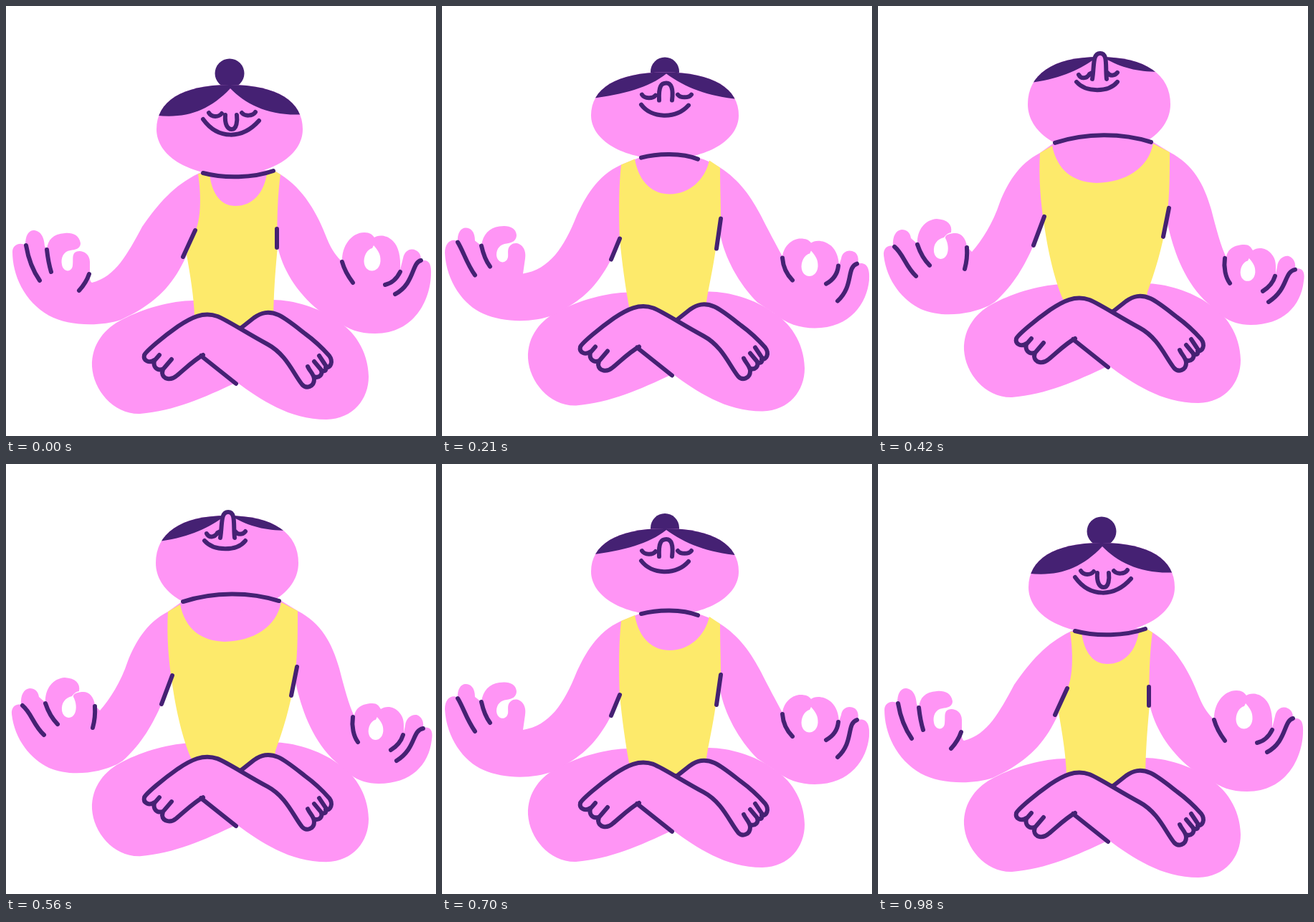
Write an HTML page with a canvas that moves like this. It is 600 px wide and 600 px high and loops after 1.05 s.

```html
<!DOCTYPE html>
<html lang="en">
<head>
<meta charset="utf-8">
<title>Meditation</title>
<style>
html, body { margin: 0; width: 100%; height: 100%; overflow: hidden; background: #fff; }
canvas { display: block; width: 100vw; height: 100vh; }
</style>
</head>
<body>
<canvas id="stage" width="600" height="600"></canvas>
<script>
const ctx = document.getElementById('stage').getContext('2d');
const SKIN = '#ff95f5', SUIT = '#fdea6b', INK = '#452173', PAPER = '#fff';
const STEP = 70, STEPS = 15, RISE = 23;

const thighs = new Path2D(`M262 411C230 411 190 423 163 437C138 449 119 472 120 503
  C122 536 150 570 187 569C235 565 275 547 322 525C355 549 395 577 447 577
  C485 576 506 548 506 517C505 480 485 453 462 439C438 421 400 410 373 410Z`);
const lap = new Path2D(`M256 438Q280 424 302 436L327 450L350 434Q366 423 384 433L384 475L256 475Z`);
const legLines = new Path2D(`M275 487C262 494 249 507 238 516C230 523 219 521 218 512L219 507L231 493
  M218 507C210 509 205 503 207 495L214 487M207 494C200 499 191 495 193 487
  C196 481 220 461 240 447C258 435 275 426 295 433C310 439 335 456 365 472
  C391 486 401 513 413 528C419 535 430 531 430 521C430 514 424 510 421 503
  M430 517C437 520 442 514 440 508L430 496M440 509C448 511 448 503 445 500L437 488
  M446 504C453 506 457 496 451 488C443 479 428 465 417 457C403 446 391 436 380 431
  C366 425 356 428 346 435L327 450M272 488L321 527`);

// x extent, top, bottom and widest height of a head outline
function headPath(l, t, r, b, mid) {
  const cx = (l + r) / 2, w = (r - l) / 2, up = (mid - t) * 0.62, dn = (b - mid) * 0.57;
  const p = new Path2D();
  p.moveTo(cx, t);
  p.bezierCurveTo(cx + w * 0.66, t, r, mid - up, r, mid);
  p.bezierCurveTo(r, mid + dn, cx + w * 0.57, b, cx, b);
  p.bezierCurveTo(cx - w * 0.57, b, l, mid + dn, l, mid);
  p.bezierCurveTo(l, mid - up, cx - w * 0.66, t, cx, t);
  return p;
}

function ringHole(x, y, s) {
  const p = new Path2D();
  p.moveTo(x + 2 * s, y - 20 * s);
  p.bezierCurveTo(x + 8 * s, y - 13 * s, x + 12 * s, y - 8 * s, x + 11.5 * s, y + 2 * s);
  p.bezierCurveTo(x + 10 * s, y + 20 * s, x - 11 * s, y + 20 * s, x - 11.5 * s, y + 2 * s);
  p.bezierCurveTo(x - 11 * s, y - 9 * s, x - 5 * s, y - 15 * s, x, y - 16 * s);
  p.closePath();
  return p;
}

function pose(o) {
  const p = { lift: o.lift, bun: o.bun, hole: ringHole(...o.hole), head: headPath(...o.head) };
  for (const k of ['skin', 'suit', 'hair', 'lines', 'face']) p[k] = new Path2D(o[k]);
  return p;
}

const restArms = `C235 250 213 275 190 308C170 345 153 378 120 386Q116 384 117 375L117 357
  C117 343 102 339 96 344C92 348 94 354 93 362C92 372 80 372 78 361C76 352 80 342 90 341
  C96 340 104 339 104 331C102 319 92 316 82 317C66 318 58 326 57 340L54 335
  C53 319 46 313 38 313C31 314 27 320 27 334C20 329 9 333 9 343C9 375 25 412 60 432
  C85 446 130 448 160 438L180 428C215 408 235 385 251 350L264 313L379 335
  C385 365 405 400 437 425L462 440C478 451 492 457 515 457C570 457 592 410 593 375
  C594 360 590 352 578 356C580 350 578 344 572 341C564 337 556 342 554 352L550 368
  C551 350 548 336 540 328C530 318 518 320 514 323C511 319 508 316 500 316
  C482 316 468 335 469 357C462 350 455 342 448 325C435 290 415 255 383 235`;
const restSuit = `C272 260 273 295 264 315L252 347C257 375 262 405 263 432L300 455L373 455
  C373 400 376 370 379 335C378 320 378 270 383 235`;
const restLines = `M28 334C31 352 38 370 47 383M57 340Q59 358 63 371M116 374Q112 386 102 397
  M264 313L247 350M469 357C472 368 478 378 484 386M550 371C545 381 538 387 529 389
  M579 355C566 358 570 388 543 402`;

const rest = pose({
  lift: 0, hole: [511, 354, 1], bun: [312, 94, 20.5],
  head: [210, 110, 414, 236, 172],
  skin: `M268 234${restArms}L373 229L276 230Z`,
  suit: `M268 234${restSuit}L373 229L364 234C360 260 345 279 320 279C300 279 287 262 284 234Z`,
  hair: `M200 100L313 100L313 115C282 148 248 158 205 152ZM313 100L425 100L418 151C370 155 335 138 313 115Z`,
  lines: `${restLines}M275 233C305 241 345 240 373 230M378 311L378 337`,
  face: `M275 158C296 187 330 186 353 160M283 149C287 156 297 155 301 150M329 149C333 154 344 154 348 148
    M306 152C305 165 309 172 315 172C322 172 323 160 322 152`
});

// shares the resting arms, so it is drawn at the resting height
const lookUp = pose({
  lift: 0, hole: [511, 354, 1], bun: [312, 99, 20.5],
  head: [210, 104, 410, 223, 160],
  skin: `M268 234${restArms}C370 225 355 221 345 221L300 221C285 223 276 229 268 234Z`,
  suit: `M268 234${restSuit}Q376 229 367 225C362 260 345 278 320 278C300 278 285 262 283 228Z`,
  hair: `M200 95L320 95L320 110C288 132 250 147 205 150ZM320 95L420 95L415 150C378 146 345 132 320 110Z`,
  lines: `${restLines}M291 223.5Q318 225 345 221M374 305L377 339`,
  face: `M276 152C294 176 332 176 354 155M283 140C287 148 297 148 301 140M333 140C337 147 347 147 351 140
    M308 151C306 136 310 134 316 134C324 134 326 141 325 150`
});

const mid = pose({
  lift: 14.1, hole: [513, 359, 1], bun: [311, 89, 20],
  head: [208, 90, 414, 211, 150],
  skin: `M250 219C215 235 200 265 188 290C170 335 150 365 113 371L116 350
    C119 332 104 324 96 331C90 336 93 343 92 348C90 358 77 357 76 345C76 335 82 330 90 329
    C98 328 104 325 104 317C103 306 92 303 80 305C66 307 57 316 55 332L46 325
    C46 312 40 307 33 307C26 307 21 315 22 326C14 321 4 327 4 342C6 382 30 415 58 427
    C85 439 125 440 155 429L178 416C205 400 222 378 236 351L248 322L388 315
    C394 348 414 385 440 411L463 426C480 441 500 447 520 447C570 447 593 412 596 380
    C597 365 594 354 580 357C582 350 580 344 576 341C568 336 558 340 557 350L554 359
    C553 348 551 340 543 332C532 323 520 324 515 328C512 324 508 322 500 322
    C490 322 477 331 475 347C466 330 455 310 445 290C432 265 415 240 388 223Q372 213 357 209L278 208Z`,
  suit: `M250 219C246 255 247 300 248 322C251 355 256 390 261 417L300 441L369 441L369 410
    C372 390 378 365 382 336L389 294C389 270 388 250 388 223L373 213C367 240 345 260 318 260
    C295 260 275 245 269 211Z`,
  hair: `M200 80L313 80L313 92C288 112 250 122 203 127ZM313 80L425 80L420 128C375 125 340 112 313 92Z`,
  lines: `M22 327C30 340 34 356 46 373M55 332Q59 350 67 361M248 322L236 351M389 294L383 336
    M475 349C476 362 480 371 489 380M553 360C552 370 547 379 536 385M579 357C564 362 575 388 552 409
    M278 209C300 203 335 202 357 211`,
  face: `M278 135C292 154 326 156 344 136M279 121C283 127 294 127 298 122M329 121C333 126 344 126 348 121
    M303 129C302 109 306 105 313 105C320 105 323 113 321 129`
});

const high = pose({
  lift: 17.25, hole: [518, 371, 0.9], bun: [310, 89, 19],
  head: [208, 80, 407, 211, 145],
  skin: `M240 215C205 230 190 255 178 275C160 315 150 335 131 356L125 350
    C123 335 116 326 109 326C104 327 101 329 98 334C97 338 100 344 97 351C93 359 83 358 81 347
    C80 338 87 330 95 329C101 328 107 324 107 316C105 306 95 303 85 305C69 308 60 319 59 334L54 325
    C51 315 45 311 38 311C30 312 26 320 27 333C20 328 9 332 9 343C12 380 30 412 60 428
    C90 441 130 437 150 429L165 418C195 397 212 372 224 345L238 312L396 315
    C405 350 425 385 452 413L480 438C492 446 505 450 525 450C570 450 592 420 595 385
    C596 375 592 366 580 370C582 365 581 359 574 356C566 354 558 358 557 370L555 377
    C555 365 555 357 548 350C540 341 530 341 524 346C521 340 518 338 510 338
    C498 338 487 345 484 357C475 345 467 325 455 295C445 265 430 235 399 219L358 199L263 203Z`,
  suit: `M240 215C235 250 238 290 239 318C243 355 250 385 260 413L300 437L367 437L374 405
    C384 375 390 345 393 318L398 293C398 270 398 245 399 219L380 208C372 234 345 253 310 255
    C283 255 262 240 255 207Z`,
  hair: `M200 70L313 70L313 85C285 105 250 112 203 118ZM313 70L415 70L412 115C370 112 340 102 313 85Z`,
  lines: `M27 333C36 345 37 360 49 376M59 334Q63 352 72 364M125 349Q125 362 119 376
    M238 312L224 345M398 293L390 328M484 358C482 370 485 380 492 388M554 382C552 392 545 398 535 403
    M580 369C564 372 574 398 549 418M263 203C295 194 330 193 358 200`,
  face: `M277 128C290 142 326 142 341 128M277 112C281 120 292 121 297 112M328 112C331 119 342 119 346 113
    M301 121C300 96 304 93 310 93C318 93 320 98 319 121`
});

const peak = pose({
  lift: 21.9, hole: [516, 371, 0.9], bun: null,
  head: [209, 72, 408, 206, 138],
  skin: `M226 206C195 222 180 250 170 275C160 305 145 328 131 344L124 337
    C123 325 116 318 108 318C101 318 93 320 94 325C98 332 99 342 96 348C92 357 80 356 78 344
    C77 333 83 326 92 324Q96 318 102 317C104 306 97 299 82 298C66 299 54 313 55 333L46 325
    C45 317 40 313 33 313C25 314 20 322 21 336C14 334 7 339 8 349C12 385 35 412 60 424
    C90 437 130 431 155 419L163 414C190 390 205 362 217 335L232 295L404 305
    C412 340 425 380 455 411L481 434C492 442 505 446 520 446C565 446 590 420 594 385
    C596 375 594 365 582 368C583 360 581 353 573 350C566 349 558 354 557 365L555 375
    C555 362 556 355 549 347C542 338 530 337 523 342C520 337 518 334 511 334
    C498 334 487 340 486 352C478 335 472 312 465 285C455 250 440 222 407 205L381 189L247 191Z`,
  suit: `M226 206C224 240 227 275 231 300C237 345 247 385 258 410L300 433L370 433L376 400
    C387 370 396 340 402 305C407 270 407 240 407 205L384 193C377 228 345 247 305 248
    C272 247 250 230 243 196Z`,
  hair: `M200 62L304 62L302 75C278 92 250 104 205 109ZM318 62L410 62L398 93C365 93 345 89 320 76Z`,
  lines: `M23 337C36 348 38 364 53 378M55 334Q61 352 72 363M124 338Q125 354 121 368
    M232 295L217 335M406 283L398 323M484 353C482 366 485 380 491 388M554 378C551 388 545 394 537 399
    M582 369C566 372 573 396 545 414M247 192C290 178 340 178 381 191`,
  face: `M277 107C290 122 322 122 334 107M280 97C283 103 291 103 295 96L299 94M320 94C323 99 330 99 334 94
    M299 103C302 85 299 67 310 67C321 67 317 85 319 103`
});

const order = [rest, rest, lookUp, mid, high, peak, peak, peak, peak, high, mid, lookUp, rest, rest, rest];
const ease = u => (1 - Math.cos(Math.PI * u)) / 2;
const lift = k => RISE * (k < 7 ? ease(k / 6) : 1 - ease((k - 7) / 7));

function fill(path, color) {
  ctx.fillStyle = color;
  ctx.fill(path);
}

function draw(k) {
  const p = order[k], up = lift(k);
  const place = y => ctx.setTransform(1, 0, 0, 1, 0, y);
  const body = () => place(p.lift - up);
  const legs = () => place(-up);

  place(0);
  ctx.fillStyle = PAPER;
  ctx.fillRect(0, 0, 600, 600);
  ctx.strokeStyle = INK;
  ctx.lineWidth = 6;
  ctx.lineCap = ctx.lineJoin = 'round';

  legs();
  fill(thighs, SKIN);
  body();
  fill(p.skin, SKIN);
  fill(p.hole, PAPER);
  fill(p.suit, SUIT);
  legs();
  fill(lap, SKIN);
  ctx.stroke(legLines);

  body();
  if (p.bun) {
    ctx.fillStyle = INK;
    ctx.beginPath();
    ctx.arc(...p.bun, 0, 2 * Math.PI);
    ctx.fill();
  }
  fill(p.head, SKIN);
  ctx.save();
  ctx.clip(p.head);
  fill(p.hair, INK);
  ctx.restore();
  if (!p.bun) {
    ctx.fillStyle = SKIN;
    ctx.fillRect(303, 70, 13, 30);
  }
  ctx.stroke(p.lines);
  ctx.stroke(p.face);
}

const start = performance.now();
function tick() {
  draw(Math.floor((performance.now() - start) / STEP) % STEPS);
  requestAnimationFrame(tick);
}
tick();
</script>
</body>
</html>
```
